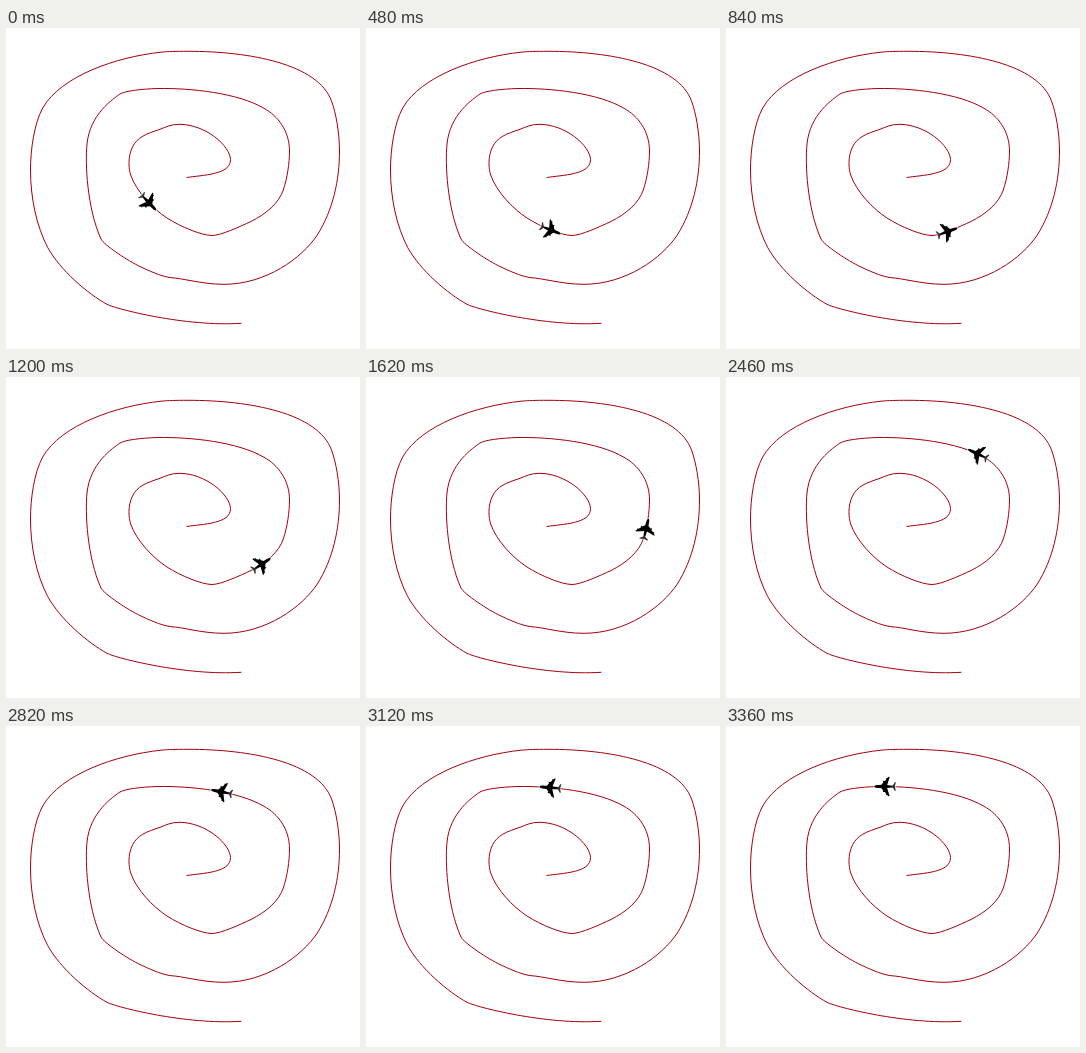
Animation, 354 px wide and 321 px high, one loop 3420 ms. Source, as an HTML page:

```html
<!DOCTYPE html>
<html lang="en">
<head>
<meta charset="utf-8">
<title>Plane on a spiral</title>
<style>
  html, body { margin: 0; width: 100%; height: 100%; overflow: hidden; background: #fff; }
  svg { display: block; width: 100vw; height: 100vh; }
</style>
</head>
<body>
<svg viewBox="0 0 354 321">
  <path id="route" fill="none" stroke="#a3000c" stroke-linecap="round" d="
    M181 149.5 C196 147 225 147 224.5 131.5 C224 118 200 96.3 173 96.3
    C165 96.3 160 99 154 101.3 C140 106 131.5 109 126.5 119 C121.5 129 122.7 141 124.7 147
    C130 163 147 181 161 190 C175 199 196 207.5 206 207.5
    C215 207.5 234 198.5 245 193.5 C260 186 273 175 277.3 162
    C281.3 150 283.5 135 283.5 123 C283.5 103 272 88 258 80.3
    C232 65 185 60 152 60.5 C135 61 119 63 114 66
    C107 71 84 86 81 116 C79 135 81 180 95 211
    C98 217 122 233 135 239 C150 246 157 248.5 165 249.7
    C171 250 178 251.5 184 252.5 C196 254.7 206 256.3 218 256.3
    C260 256.3 296 230 311.3 207 C327 182 333.5 152 333.5 123
    C333.5 105 330 85 325.5 73 C312 36 244 23.3 182 23.3 C170 23.3 162 23.5 155 24.2
    C110 29 55 48 36.7 80 C28 96 24.5 122 24.5 142
    C24.5 170 30.5 198 41.7 219.5 C54 242 82 266 101 276.3
    C110 281 180 299 235 295.3"/>
  <g id="plane">
    <path d="M11 0 C10.5 -1.1 8.5 -1.5 6 -1.5 L3.6 -1.7 L1.7 -4.3 L2.3 -5.6 L0.2 -5.6
      L-1.4 -7.6 L-1 -8.5 L-2.6 -8.7 L-3.6 -9.8 L-4.6 -9.4 L-2.1 -1.5 L-7.4 -0.9
      L-11 0 L-7.4 0.9 L-2.1 1.5 L-4.6 9.4 L-3.6 9.8 L-2.6 8.7 L-1 8.5 L-1.4 7.6
      L0.2 5.6 L2.3 5.6 L1.7 4.3 L3.6 1.7 L6 1.5 C8.5 1.5 10.5 1.1 11 0 Z"
      stroke="#fff" stroke-width="1.2" paint-order="stroke"/>
    <path fill="#333" d="M-7 0 L-9.8 -4.2 L-10.9 -4.2 L-9.7 0 L-10.9 4.2 L-9.8 4.2 Z"/>
  </g>
</svg>
<script>
const LOOP = 3420, STEP = 60;
const route = document.getElementById('route');
const plane = document.getElementById('plane');
const total = route.getTotalLength();

// Distance along the route that lies closest to (x, y).
function distanceAt(x, y) {
  let best = 0, min = Infinity;
  for (let s = 0; s < total; s += 0.25) {
    const p = route.getPointAtLength(s);
    const d = Math.hypot(p.x - x, p.y - y);
    if (d < min) { min = d; best = s; }
  }
  return best;
}

const from = distanceAt(142.5, 174.5);
const to = distanceAt(159, 60.5);

function draw(time) {
  const step = Math.floor((time % LOOP) / STEP);
  const s = from + (to - from) * step / (LOOP / STEP - 1);
  const p = route.getPointAtLength(s);
  const a = route.getPointAtLength(s - 4);
  const b = route.getPointAtLength(s + 4);
  const angle = Math.atan2(b.y - a.y, b.x - a.x) * 180 / Math.PI;
  plane.setAttribute('transform', `translate(${p.x} ${p.y}) rotate(${angle})`);
}

const start = performance.now();
function tick() {
  draw(performance.now() - start);
  requestAnimationFrame(tick);
}
tick();
</script>
</body>
</html>
```
